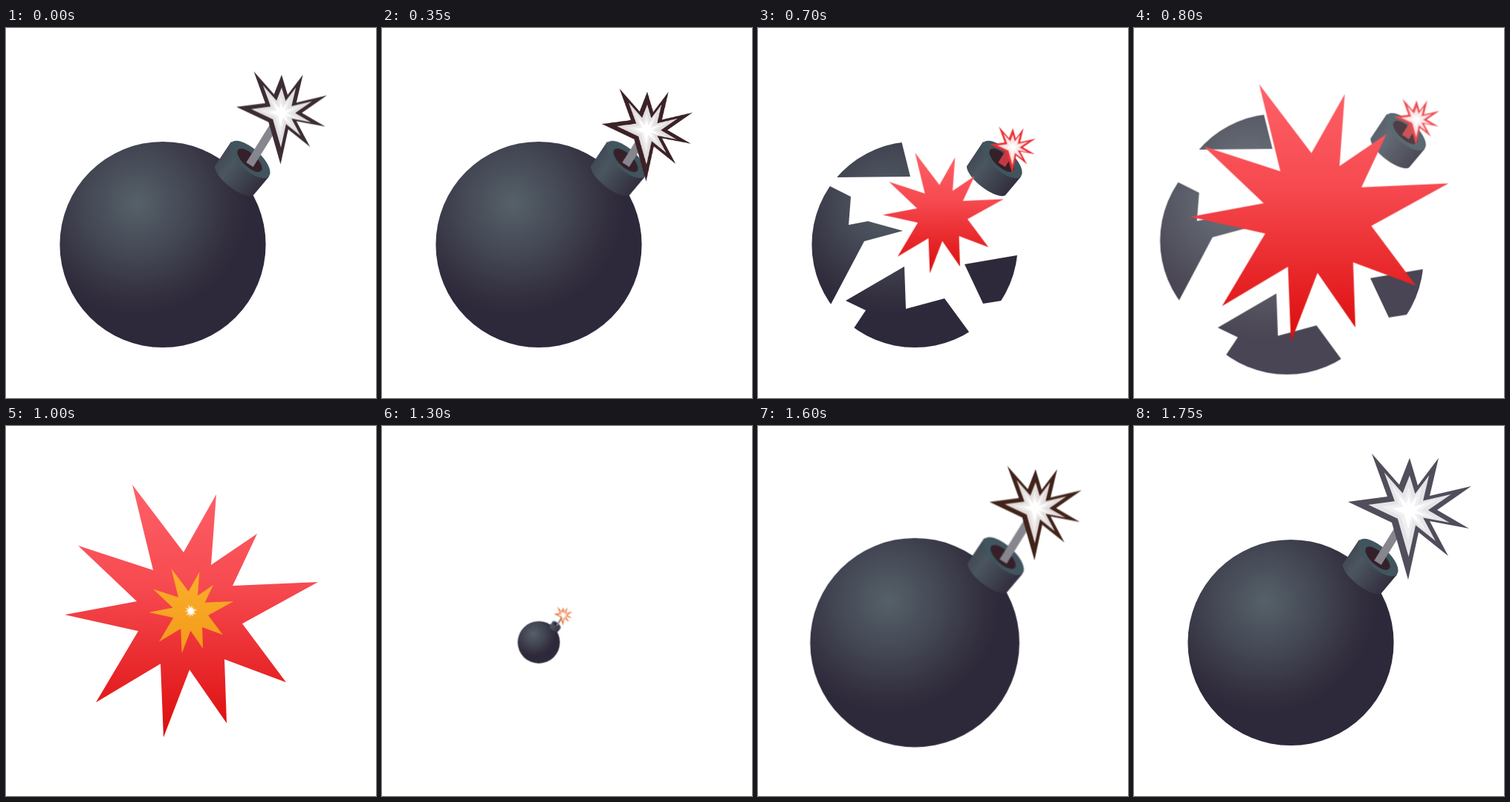
Write an HTML page without scripts that moves like this. It is 498 by 498 pixels and loops after 1.8 s.

```html
<!DOCTYPE html>
<html lang="en">
<head>
<meta charset="utf-8">
<title>Bomb</title>
<style>
  html, body { margin: 0; width: 100%; height: 100%; overflow: hidden; background: #fff; }
  svg { display: block; width: 100vw; height: 100vh; }
  /* Motion runs at 20 steps per second: 50 ms is 2.77% of the loop. */
  .bomb, .ball, .shard, .spark, .burst, .pulse, .fuse, .blast {
    animation: 1.8s step-end infinite;
  }
  .bomb { transform-origin: 211px 291px; animation-name: pop; }
  .ball { animation-name: whole; }
  .shard { animation-name: fly; }
  .cap { animation-name: launch; }
  .spark { animation-name: burn; }
  .pulse { animation-name: pulse; }
  .burst { animation-name: tint; }
  .fuse { animation-name: shorten, glow; stroke-dasharray: 100 200; }
  .blast { transform-origin: 249px 249px; }
  .red { animation-name: red; }
  .yellow { animation-name: yellow; }
  .white { animation-name: white; }

  @keyframes pop {
    0% { transform: scale(1); }
    61.11% { transform: scale(0); }
    72.22% { transform: scale(.205); }
    75% { transform: scale(.7); }
    77.77% { transform: scale(1.05); }
    80.55% { transform: scale(1.17); }
    83.33% { transform: scale(1.08); }
    86.11% { transform: scale(1); }
    88.88% { transform: scale(1.016); }
    91.66% { transform: scale(1.006); }
    94.44%, 100% { transform: scale(1); }
  }
  @keyframes whole {
    0% { visibility: visible; }
    36.11% { visibility: hidden; }
    72.22%, 100% { visibility: visible; }
  }
  @keyframes fly {
    0% { visibility: hidden; transform: none; opacity: 1; }
    36.11% { visibility: visible; transform: none; opacity: 1; }
    38.88% { visibility: visible; transform: translate(0, 0); opacity: 1; animation-timing-function: steps(3); }
    47.22% { visibility: visible; transform: translate(calc(var(--dx) * .8), calc(var(--dy) * .8)); opacity: .8; animation-timing-function: steps(2); }
    52.77% { visibility: visible; transform: translate(var(--dx), var(--dy)); opacity: 0; }
    72.22%, 100% { visibility: hidden; transform: none; opacity: 1; }
  }
  @keyframes launch {
    0% { transform: none; opacity: 1; }
    38.88% { transform: translate(0, 0); opacity: 1; animation-timing-function: steps(3); }
    47.22% { transform: translate(56px, -56px); opacity: .8; animation-timing-function: steps(2); }
    52.77% { transform: translate(70px, -70px); opacity: 0; }
    72.22%, 100% { transform: none; opacity: 1; }
  }
  @keyframes burn {
    0% { transform: translate(371px, 115px); animation-timing-function: steps(14); }
    38.88% { transform: translate(343px, 161px); }
    61.11%, 100% { transform: translate(371px, 114px); }
  }
  @keyframes shorten {
    0% { stroke-dashoffset: 0; animation-timing-function: steps(14); }
    38.88% { stroke-dashoffset: 67; }
    61.11%, 100% { stroke-dashoffset: 0; }
  }
  @keyframes glow {
    0% { stroke: #87858e; }
    33.33% { stroke: #c23a40; }
    61.11%, 100% { stroke: #87858e; }
  }
  @keyframes pulse {
    0% { transform: scale(.735); }
    22.22% { transform: scale(.735); animation-timing-function: steps(6); }
    38.88% { transform: scale(.37); }
    72.22%, 77.77%, 83.33%, 88.88%, 94.44% { transform: scale(.735); }
    75%, 86.11%, 97.22%, 100% { transform: scale(1); }
    80.55%, 91.66% { transform: scale(.55); }
  }
  @keyframes tint {
    0% { fill: #3c2d35; }
    8.33% { fill: #3c2226; }
    33.33% { fill: #ec3236; }
    72.22% { fill: #ea661f; }
    77.77% { fill: #41231a; }
    91.66%, 100% { fill: #514d5b; }
  }
  @keyframes red {
    0% { transform: scale(0); }
    33.33% { transform: scale(.06); }
    36.11% { transform: scale(.25); }
    38.88% { transform: scale(.478); }
    41.66% { transform: scale(.78); }
    44.44% { transform: scale(1.02); }
    47.22% { transform: scale(1.115); }
    50% { transform: scale(1.07); }
    52.77% { transform: scale(1.01); }
    55.55% { transform: scale(1); }
    61.11%, 100% { transform: scale(0); }
  }
  @keyframes yellow {
    0% { transform: scale(0); }
    52.77% { transform: scale(.08); }
    55.55% { transform: scale(.335); }
    58.33% { transform: scale(.75); }
    61.11%, 100% { transform: scale(0); }
  }
  @keyframes white {
    0% { transform: scale(0); }
    55.55% { transform: scale(.05); }
    58.33% { transform: scale(.42); }
    61.11%, 100% { transform: scale(0); }
  }
</style>
</head>
<body>
<svg viewBox="0 0 498 498">
  <defs>
    <radialGradient id="iron" gradientUnits="userSpaceOnUse" cx="176" cy="236" r="150">
      <stop offset="0" stop-color="#566168"/>
      <stop offset=".45" stop-color="#444855"/>
      <stop offset=".85" stop-color="#332f3f"/>
      <stop offset="1" stop-color="#2e293a"/>
    </radialGradient>
    <linearGradient id="side" gradientUnits="userSpaceOnUse" x1="286" y1="172" x2="342" y2="215">
      <stop offset="0" stop-color="#3f4753"/>
      <stop offset=".3" stop-color="#4b5660"/>
      <stop offset="1" stop-color="#322e3e"/>
    </linearGradient>
    <linearGradient id="fire" x2="0" y2="1">
      <stop offset="0" stop-color="#ff6168"/>
      <stop offset=".4" stop-color="#f64a50"/>
      <stop offset="1" stop-color="#dd0c0c"/>
    </linearGradient>
    <linearGradient id="amber" x2="0" y2="1">
      <stop offset="0" stop-color="#fbb02c"/>
      <stop offset="1" stop-color="#f39a1a"/>
    </linearGradient>
    <circle id="disc" cx="211" cy="291.5" r="138.6" fill="url(#iron)"/>
    <path id="star" d="M170 79 239 170 283 92 276 187 338 145 305 215 420 210 318 266 377 345 294 314 297 400 247 328 212 419 208 320 121 372 178 276 79 254 176 236 97 161 198 194Z"/>
    <path id="flash" d="M-51-77-14-35 0-71 11-34 39-71 27-20 83-33 37-1 80 24 27 14 52 61 12 29-2 93-24 16-83-12-30-19Z"/>
    <clipPath id="top"><path d="M106 201 80 140 190 140 205 200Z"/></clipPath>
    <clipPath id="left"><path d="M97 213 125 227 122 265 148 260 195 273 143 287 98 372 50 372 50 213Z"/></clipPath>
    <clipPath id="bottom"><path d="M118 367 197 321 199 378 251 364 284 409 284 450 110 450 129 404 145 380Z"/></clipPath>
    <clipPath id="right"><path d="M278 318 360 304 360 367 328 367 303 371Z"/></clipPath>
  </defs>

  <g class="bomb">
    <use class="ball" href="#disc"/>
    <g class="shard" style="--dx:-35px;--dy:-70px"><use href="#disc" clip-path="url(#top)"/></g>
    <g class="shard" style="--dx:-70px;--dy:-10px"><use href="#disc" clip-path="url(#left)"/></g>
    <g class="shard" style="--dx:-10px;--dy:68px"><use href="#disc" clip-path="url(#bottom)"/></g>
    <g class="shard" style="--dx:75px;--dy:35px"><use href="#disc" clip-path="url(#right)"/></g>
    <g class="shard cap">
      <path d="M303 153 281 186A33 12 38 0 0 333 225L354 200Z" fill="url(#side)"/>
      <ellipse cx="328.5" cy="177" rx="34" ry="14.5" transform="rotate(42 328.5 177)" fill="#40555d"/>
      <ellipse cx="328" cy="178" rx="21" ry="9" transform="rotate(43 328 178)" fill="#35202a"/>
      <path class="fuse" pathLength="100" d="M328 184 371 115" fill="none" stroke-width="11"/>
      <g class="spark"><g class="pulse">
        <use class="burst" href="#flash"/>
        <use href="#flash" transform="scale(.67)" fill="#fff" fill-opacity=".85"/>
        <use href="#flash" transform="translate(-1) scale(.45)" fill="#fff" fill-opacity=".4"/>
        <use href="#flash" transform="translate(-1) scale(.27)" fill="#fff"/>
      </g></g>
    </g>
  </g>

  <use class="blast red" href="#star" fill="url(#fire)"/>
  <use class="blast yellow" href="#star" fill="url(#amber)"/>
  <use class="blast white" href="#star" fill="#fff"/>
</svg>
</body>
</html>
```
